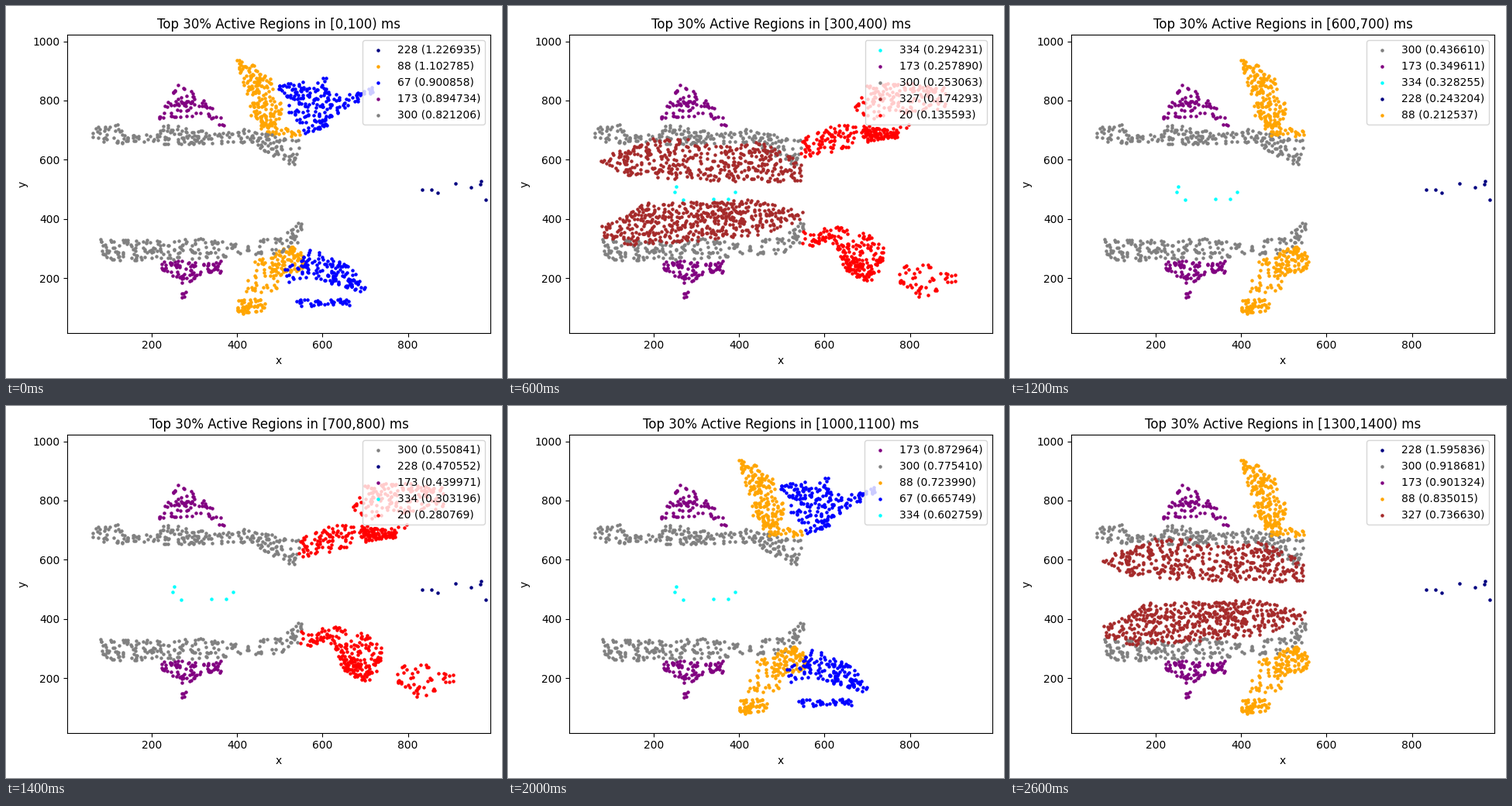
Write a matplotlib script that moves like this. It is 640 by 480 pixels and loops after 2800 ms.

```python
import numpy as np
import matplotlib.pyplot as plt
from matplotlib.animation import FuncAnimation

STEP_MS = 200

# Regions ranked by activity in each window of 100 ms.
ORDER = [row.split() for row in (
    "228 88 67 173 300",
    "228 300 173 88 327",
    "300 173 228 334 327",
    "334 173 300 327 20",
    "334 173 300 327 20",
    "334 173 300 327 20",
    "300 173 334 228 88",
    "300 228 173 334 20",
    "300 173 228 88 348",
    "300 173 228 88 348",
    "173 300 88 67 334",
    "228 173 88 300 348",
    "173 88 300 327 348",
    "228 300 173 88 327",
)]

# Rates by rank at some windows; those between are interpolated.
KNOTS = (0, 3, 5, 7, 9, 11, 13)
RATES = (
    (1.226935, 0.294231, 0.322379, 0.550841, 0.831924, 0.914003, 1.595836),
    (1.102785, 0.257890, 0.228669, 0.470552, 0.703184, 0.847636, 0.918681),
    (0.900858, 0.253063, 0.216539, 0.439971, 0.635988, 0.811991, 0.901324),
    (0.894734, 0.174293, 0.183213, 0.303196, 0.600970, 0.730527, 0.835015),
    (0.821206, 0.135593, 0.144305, 0.280769, 0.585121, 0.620397, 0.736630),
)

rng = np.random.default_rng(7)
fig, ax = plt.subplots(figsize=(6.4, 4.8), dpi=100)
ax.set(xlim=(2.3, 993.3), ylim=(15.5, 1021.5), xlabel="x", ylabel="y")
dots = {}


def band(n, xs, low, high):
    """Fill the strip between two polylines with n evenly spread points."""
    fine = np.linspace(xs[0], xs[-1], 400)
    lo, hi = np.interp(fine, xs, low), np.interp(fine, xs, high)
    area = np.cumsum(hi - lo)
    x = np.interp(rng.random(n) * area[-1], area, fine)
    y = np.interp(x, fine, lo) + rng.random(n) * np.interp(x, fine, hi - lo)
    return np.column_stack([x, y])


def region(key, color, *parts):
    pts = np.vstack(parts)
    dots[key] = ax.scatter(pts[:, 0], pts[:, 1], s=5, color=color)


region("228", "navy",
       np.column_stack([(833, 855, 870, 911, 948, 970, 971, 982),
                        (500, 498, 488, 520, 507, 517, 527, 465)]))
region("334", "cyan",
       np.column_stack([(249, 253, 269, 340, 374, 391),
                        (491, 509, 465, 467, 467, 491)]))
region("173", "purple",
       band(78, (217, 250, 265, 325, 370), (715, 740, 745, 745, 705),
            (745, 835, 865, 800, 730)),
       band(90, (214, 260, 272, 290, 325, 367), (238, 195, 110, 185, 220, 205),
            (252, 260, 260, 262, 250, 270)))
region("300", "gray",
       band(235, (45, 85, 125, 140, 210, 230, 290, 360, 440, 465, 545),
            (685, 660, 650, 660, 660, 650, 652, 655, 655, 620, 575),
            (700, 715, 725, 685, 690, 725, 705, 690, 710, 690, 670)),
       band(215, (78, 125, 215, 300, 420, 500, 540, 560),
            (280, 250, 262, 262, 280, 280, 315, 395),
            (335, 330, 328, 335, 325, 340, 385, 405)))
region("88", "orange",
       band(85, (395, 425, 485), (925, 810, 835), (940, 935, 865)),
       band(80, (428, 465, 503), (745, 705, 740), (790, 825, 800)),
       band(45, (455, 553), (680, 680), (745, 700)),
       band(52, (400, 465), (76, 90), (130, 130)),
       band(24, (420, 500), (140, 165), (215, 210)),
       band(110, (440, 490, 530, 560), (225, 200, 215, 240), (255, 298, 315, 270)))
region("67", "blue",
       band(38, (497, 560), (830, 770), (860, 865)),
       band(110, (515, 560, 600, 650, 685), (750, 715, 725, 770, 800),
            (800, 850, 835, 815, 835)),
       band(27, (555, 610), (683, 715), (700, 745)),
       band(12, (570, 608), (820, 825), (860, 890)),
       band(18, (670, 720), (800, 825), (835, 850)),
       band(140, (512, 575, 660, 700), (185, 200, 165, 150), (230, 300, 245, 190)),
       band(36, (540, 665), (104, 110), (130, 130)))
region("20", "red",
       band(115, (545, 625, 720, 797), (608, 630, 665, 705), (680, 722, 700, 718)),
       band(80, (690, 770), (665, 675), (715, 702)),
       band(150, (672, 700, 790, 890), (760, 735, 760, 775), (780, 850, 865, 845)),
       band(165, (545, 620, 665, 710, 740), (300, 315, 205, 185, 250),
            (360, 375, 365, 345, 300)),
       band(50, (640, 710), (230, 180), (290, 260)),
       band(52, (775, 825, 910), (180, 120, 175), (240, 258, 225)))
region("348", "pink",
       band(150, (265, 310, 350, 405, 430), (840, 800, 790, 790, 790),
            (880, 930, 955, 930, 850)),
       band(45, (362, 440), (715, 700), (790, 750)),
       band(100, (325, 425), (98, 100), (128, 130)),
       band(40, (268, 335, 400), (85, 65, 78), (130, 110, 105)),
       band(45, (310, 350, 440), (130, 130, 165), (160, 200, 215)),
       band(60, (355, 400, 460), (220, 228, 240), (255, 282, 285)))
region("327", "brown",
       band(420, (68, 130, 200, 300, 340, 455, 546),
            (600, 550, 540, 530, 530, 525, 530),
            (615, 635, 672, 672, 645, 660, 590)),
       band(510, (76, 130, 175, 440, 550), (345, 310, 310, 345, 395),
            (375, 410, 455, 465, 425)))


def draw(k):
    for d in dots.values():
        d.set_visible(False)
    shown = []
    for i, key in enumerate(ORDER[k]):
        d = dots[key]
        d.set_visible(True)
        d.set_zorder(1 + 0.1 * i)
        d.set_label(f"{key} ({np.interp(k, KNOTS, RATES[i]):.6f})")
        shown.append(d)
    ax.legend(handles=shown, loc="upper right")
    ax.set_title(f"Top 30% Active Regions in [{100 * k},{100 * (k + 1)}) ms")
    return shown


draw(0)
fig.tight_layout()
anim = FuncAnimation(fig, draw, frames=len(ORDER), interval=STEP_MS,
                     repeat=True, repeat_delay=0, blit=False)
plt.show()
```
